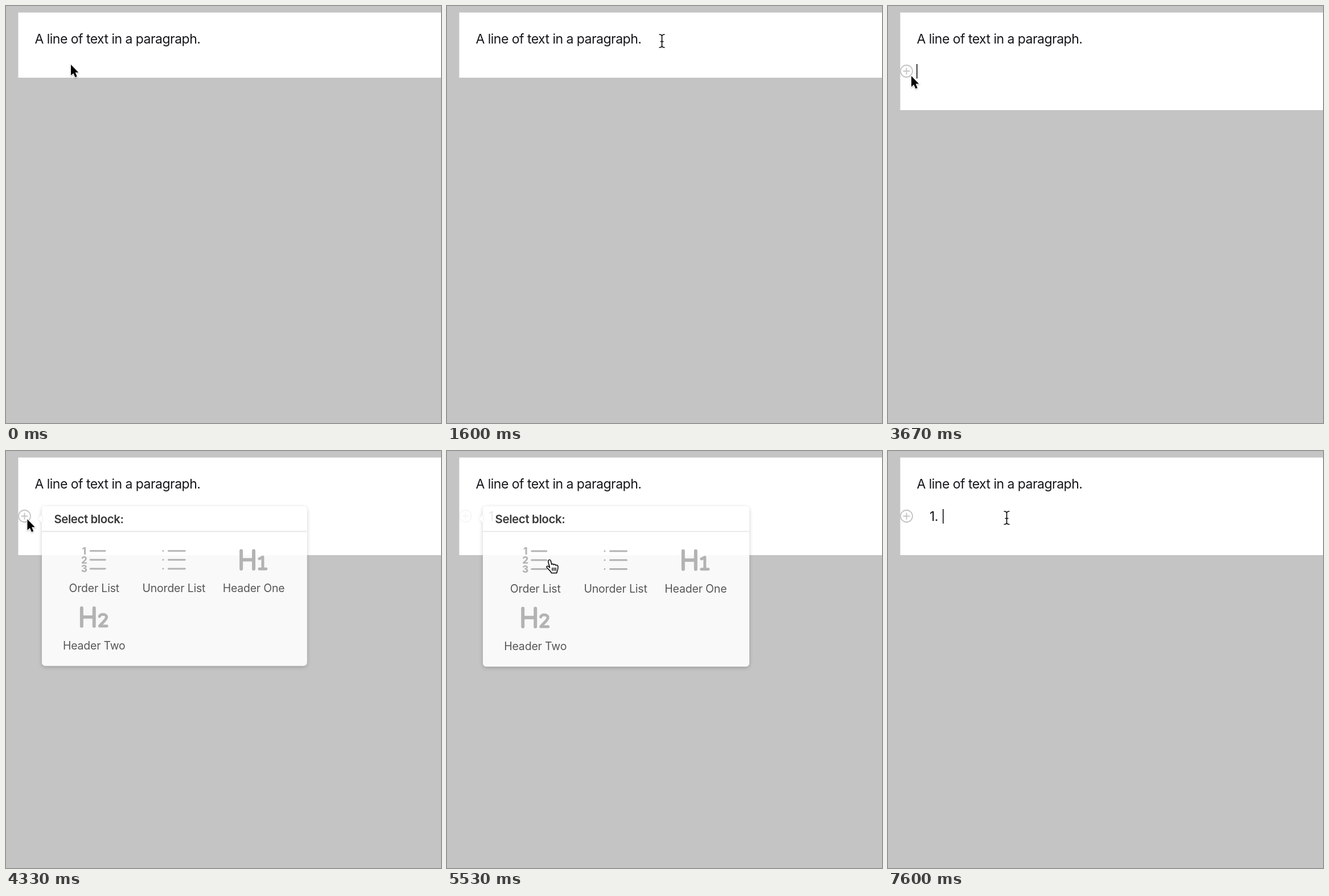
Write an HTML page that moves like this. It is 764 px wide and 733 px high and loops after 8000 ms.

```html
<!DOCTYPE html>
<html lang="en">
<head>
<meta charset="utf-8">
<title>Block editor</title>
<style>
  html, body { margin: 0; width: 100%; height: 100%; overflow: hidden; background: #c4c4c4; }
  svg { position: absolute; left: 0; top: 0; overflow: visible; }
  text { font-family: Inter, "Liberation Sans", sans-serif; font-optical-sizing: none; }
  .body { font-size: 23px; letter-spacing: -.53px; fill: #14161b; }
  .title { font-size: 20.5px; font-weight: 600; letter-spacing: -.4px; fill: #383838; }
  .label { font-size: 19.5px; letter-spacing: -.17px; fill: #575757; text-anchor: middle; }
  .digit { font-size: 17px; font-weight: 800; fill: #b3b3b3; text-anchor: middle; }
  .icon { fill: none; stroke: #b3b3b3; stroke-width: 3; stroke-linecap: round; stroke-linejoin: round; }
  .stem { stroke-width: 6; }
  .level { stroke-width: 5; }
  #popup {
    position: absolute; left: 63px; top: 97px; width: 467.5px; height: 281.5px;
    border-radius: 6px; background: rgba(255, 255, 255, .9);
    box-shadow: 0 2px 7px rgba(0, 0, 0, .2); transform-origin: 0 22px;
  }
  #popup svg { left: -63px; top: -97px; }
  #tail { fill: #fff; filter: drop-shadow(0 0 2px rgba(0, 0, 0, .1)); }
  #arrow { filter: drop-shadow(0 1.5px 1px rgba(0, 0, 0, .3)); }
</style>
</head>
<body>
<svg width="764" height="733">
  <rect id="panel" x="21.5" y="11.5" width="743" fill="#fff"/>
  <text class="body" x="50.5" y="66">A line of text in a paragraph.</text>
  <text class="body" id="item" x="73" y="123">1.</text>
  <g id="plus" fill="none" stroke="#c3c3c3" stroke-width="1.8">
    <circle cx="32.5" cy="114.5" r="10.5"/>
    <path d="M26.5 114.5h12M32.5 108.5v12"/>
  </g>
  <rect id="caret" width="1.6" height="25.5" fill="#111"/>
</svg>

<div id="popup">
  <svg width="764" height="733">
    <path id="tail" d="M63 112l-7 7 7 7z"/>
    <path d="M63 141.5h467.5" stroke="#e3e3e3" stroke-width="1.6"/>
    <text class="title" x="84.5" y="127">Select block:</text>
    <g id="menu"></g>
  </svg>
</div>

<svg width="764" height="733">
  <path id="arrow" d="M0 0V19L4.4 15.2L7.5 22.3L10.7 20.9L7.7 13.8H13.2Z"
    fill="#000" stroke="#fff" stroke-width="2" paint-order="stroke"/>
  <path id="beam" fill="none" stroke="#111" stroke-width="1.7"
    d="M-5-11.5Q0-11.5 0-8V8Q0 11.5-5 11.5M5-11.5Q0-11.5 0-8M0 8Q0 11.5 5 11.5M-3 1H3"/>
  <g id="hand" stroke="#000" stroke-width="1.5" stroke-linejoin="round" stroke-linecap="round">
    <path fill="#fff" d="M0 1.5C1-.2 3.6 0 4.2 2L6 8.5C6.500 7 9 7 9.5 9C10.5 7.6 12.5 8 13 10C14.5 8.800 16.800 9.800 17 12L16.700 16C16.500 19 14.800 20.500 14.800 23.500H5.500C4.500 20.500 .5 17.500-2.500 14C-4 11.800-2 10.500 0 11.800L2.500 14L-.2 4Z"/>
    <path d="M7 14.5v4.5M10 14.5v4.5M13 14.5v4.5"/>
  </g>
</svg>

<script>
const LOOP = 8000, BLINK = 530;
const CLICK = 1070, ENTER = 2470, OPEN = 4070, PICK = 5480, CLOSE = 5560, CLOSED = 5800;

// Pointer moves: from, to, target x, target y, upward bow
const moves = [
  [70, 870, 382, 50, 50],
  [930, 1400, 377.5, 61.5, 0],
  [1940, 2200, 300, 60, 0],
  [2800, 3530, 16, 121, 0],
  [3530, 3670, 41, 123, 0],
  [3730, 4000, 37.5, 120, 0],
  [4470, 5130, 178, 191, 0],
  [6000, 6270, 187, 142.5, 0],
  [6270, 6670, 208.5, 117.5, 0]
];

const el = id => document.getElementById(id);
const ramp = (t, from, to) => Math.min(1, Math.max(0, (t - from) / (to - from)));
const within = (v, from, to) => v >= from && v < to;
const show = (id, on) => { el(id).style.visibility = on ? "visible" : "hidden"; };

// Menu icons, drawn around their centre
const icon = (d, kind = "") => `<path class="icon ${kind}" d="${d}"/>`;
const rows = draw => [-1, 0, 1].map(i => draw(i * 15.8, i + 2)).join("");
const heading = level => icon("M-22-16v32M0-16v32M-22 0h22", "stem") + icon(level, "level");
const items = [
  ["Order List", rows((y, n) => `<text class="digit" x="-17.5" y="${y + 6.2}">${n}</text>` + icon(`M-6.500 ${y}h26`))],
  ["Unorder List", rows(y => icon(`M-19 ${y}h0M-9.500 ${y}h29`))],
  ["Header One", heading("M10-2l6-3v21M10 16h12")],
  ["Header Two", heading("M9.5-1C10-6 22-6 22 0C22 5 14 10 9.500 16H22.500")]
];
el("menu").innerHTML = items.map(([name, art], i) =>
  `<g transform="translate(${155.2 + 140.8 * (i % 3)} ${191.7 + 101 * Math.floor(i / 3)})">
    ${art}<text class="label" y="57.300">${name}</text></g>`).join("");

function pointerAt(t) {
  let x = 114, y = 103;
  for (const [from, to, toX, toY, bow] of moves) {
    const p = ramp(t, from, to), k = p * p * (3 - 2 * p);
    x += (toX - x) * k;
    y += (toY - y) * k - bow * Math.sin(Math.PI * p);
  }
  return [x, y];
}

function pointerKind(t, x, y) {
  if (within(t, ENTER, 2870)) return "none";
  if (within(t, OPEN, CLOSED)) return x > 85 && y > 155 ? "hand" : "arrow";
  const onText = x > 50 && (within(y, 40, 76) || t > ENTER && within(y, 99, 132));
  return onText ? "beam" : "arrow";
}

// Each edit moves the caret and restarts its blinking.
function drawCaret(t) {
  const [since, x, y] = t < ENTER ? [CLICK, 341, 44.5] : t < PICK ? [ENTER, 50, 102] : [PICK, 96, 102];
  const lit = Math.floor((t - since) / BLINK) % 2 === 0;
  show("caret", t >= CLICK && lit && !within(t, OPEN, CLOSED));
  el("caret").setAttribute("x", x);
  el("caret").setAttribute("y", y);
}

function drawPopup(t) {
  const grown = 1 - (1 - ramp(t, OPEN, 4500)) ** 4;
  const gone = ramp(t, CLOSE, CLOSED);
  show("popup", within(t, OPEN, CLOSED));
  el("popup").style.opacity = ramp(t, OPEN, 4270) * (1 - gone);
  el("popup").style.transform = `scale(${0.8 + 0.2 * grown - 0.1 * gone * gone})`;
}

function draw(t) {
  el("panel").setAttribute("height", t < ENTER ? 114.5 : 171.5);
  show("item", t >= PICK);
  el("plus").style.opacity = ramp(t, ENTER, 2730) - ramp(t, PICK - 140, CLOSE) + ramp(t, 6000, 6240);
  drawCaret(t);
  drawPopup(t);

  const [x, y] = pointerAt(t), kind = pointerKind(t, x, y);
  for (const id of ["arrow", "beam", "hand"]) {
    show(id, id === kind);
    el(id).setAttribute("transform", `translate(${x} ${y})`);
  }
}

const start = performance.now();
function tick() {
  draw((performance.now() - start) % LOOP);
  requestAnimationFrame(tick);
}
tick();
</script>
</body>
</html>
```
